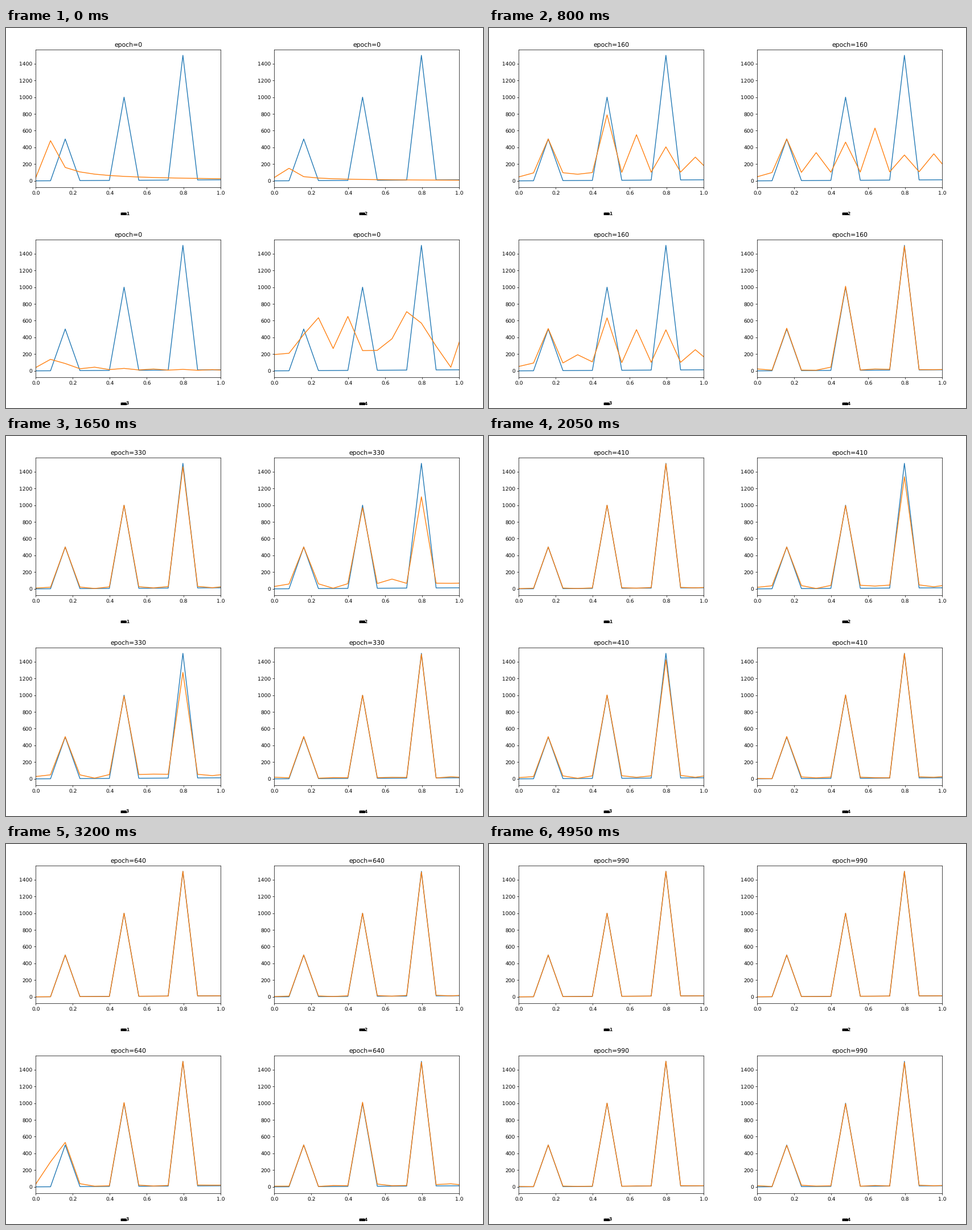
These frames come from a looping animation (838 px wide and 668 px high, 5000 ms). A matplotlib script:

```python
import numpy as np
import matplotlib.pyplot as plt
from matplotlib.animation import FuncAnimation

W, H, DPI = 838, 668, 64
CELL_W, CELL_H = 419, 334
SCALE = CELL_W / 640          # each chart is a default 640x480 plot, scaled down
PT = SCALE * 100 / DPI        # keeps point sizes in step with that scale
FRAMES, INTERVAL, STEP = 100, 50, 10

I = np.arange(14)
X = I / (4 * np.pi)
TRUTH = I.astype(float)
TRUTH[2::4] = 500, 1000, 1500
GUESS = np.array([195, 210, 435, 635, 267, 650, 242,
                  245, 383, 707, 570, 295, 43, 568])


def smoothstep(u):
    u = np.clip(u, 0, 1)
    return u * u * (3 - 2 * u)


def noise(epoch):
    """Positive jitter that calms down as training goes on."""
    sample = np.random.default_rng(epoch).normal(size=I.size)
    return np.abs(sample) * np.exp(-epoch / 1200)


def first_output(gain, ripple):
    """Untrained curve: a decay with an optional zigzag."""
    y = gain / np.maximum(I, 1) * (1 + ripple * np.cos(np.pi * I))
    y[0] = 40
    y[1] += gain / 2
    return y


def learn_peaks(epoch, mid, width, gain, ripple=0, jitter=0, bursts=()):
    """The peaks are learned left to right, with false ones in between."""
    def learned(center):
        return 1 / (1 + np.exp((center - epoch) / (width * center)))

    def false_peak(skill):
        return 900 * (1 - skill) ** 1.6

    second, third = learned(mid), learned(1.54 * mid)
    y = I + 110 * np.sqrt(1 - third)
    y[0] /= 2
    y[2::4] = 500, 1000 * second, 1500 * third
    y[4::4] = I[4::4] + [false_peak(second), false_peak(third),
                         false_peak(third) / 2]
    for center, height in bursts:
        kick = height * np.exp(-((epoch - center) / 20) ** 2)
        y[:4] += kick * np.array([0.1, 1, 0.1, 0.1])
    mix = smoothstep(epoch / 160)
    start = first_output(gain, ripple)
    return (1 - mix) * start + mix * (y + jitter * noise(epoch))


def learn_fast(epoch):
    """A random guess that settles quickly but stays restless."""
    settled = 0.99 * TRUTH + 18 * noise(epoch)
    return settled + (GUESS - settled) * np.exp(-epoch / 30)


LEARNERS = [
    lambda e: learn_peaks(e, mid=128, width=0.19, gain=320),
    lambda e: learn_peaks(e, mid=167, width=0.28, gain=100),
    lambda e: learn_peaks(e, mid=137, width=0.33, gain=125, ripple=0.4,
                          jitter=6, bursts=[(260, 640), (640, 290)]),
    learn_fast,
]


def caption(x, y, digit):
    """Tiny smeared label below a chart."""
    style = dict(ha="center", va="center_baseline", weight="bold",
                 size=7.5 * 72 / DPI)
    for dx in (-0.8, 0, 0.8):
        fig.text((x - 0.5 + dx) / W, 1 - y / H, "nn", **style)
    fig.text((x + 6) / W, 1 - y / H, str(digit), **style)


plt.rcParams.update({
    "font.family": "DejaVu Sans",
    "text.hinting": "none",
    "axes.linewidth": 0.8 * PT,
    "axes.titlesize": 12 * PT,
    "axes.titlepad": 6 * PT,
    "lines.linewidth": 1.5 * PT,
})
for axis in ("xtick", "ytick"):
    plt.rcParams.update({
        f"{axis}.labelsize": 10 * PT,
        f"{axis}.major.size": 3.5 * PT,
        f"{axis}.major.width": 0.8 * PT,
        f"{axis}.major.pad": 3.5 * PT,
    })

fig = plt.figure(figsize=(W / DPI, H / DPI), dpi=DPI, facecolor="white")
titles, lines = [], []
for i in range(4):
    left, top = CELL_W * (i % 2), CELL_H * (i // 2)
    bottom = top + 427.2 * SCALE
    ax = fig.add_axes([(left + 80 * SCALE) / W, 1 - bottom / H,
                       496 * SCALE / W, 369.6 * SCALE / H])
    ax.set(xlim=(0, 1), ylim=(-74.8, 1570),
           xticks=np.arange(0, 1.1, 0.2), yticks=range(0, 1401, 200))
    ax.plot(X, TRUTH, color="C0")
    lines.append(ax.plot(X, TRUTH, color="C1")[0])
    titles.append(ax.set_title("epoch=0"))
    caption(left + 207.5, top + 325.5, i + 1)


def update(frame):
    epoch = frame * STEP
    for title, line, learner in zip(titles, lines, LEARNERS):
        title.set_text(f"epoch={epoch}")
        line.set_ydata(learner(epoch))
    return titles + lines


anim = FuncAnimation(fig, update, frames=FRAMES, interval=INTERVAL,
                     repeat=True, repeat_delay=0, blit=False)
plt.show()
```
